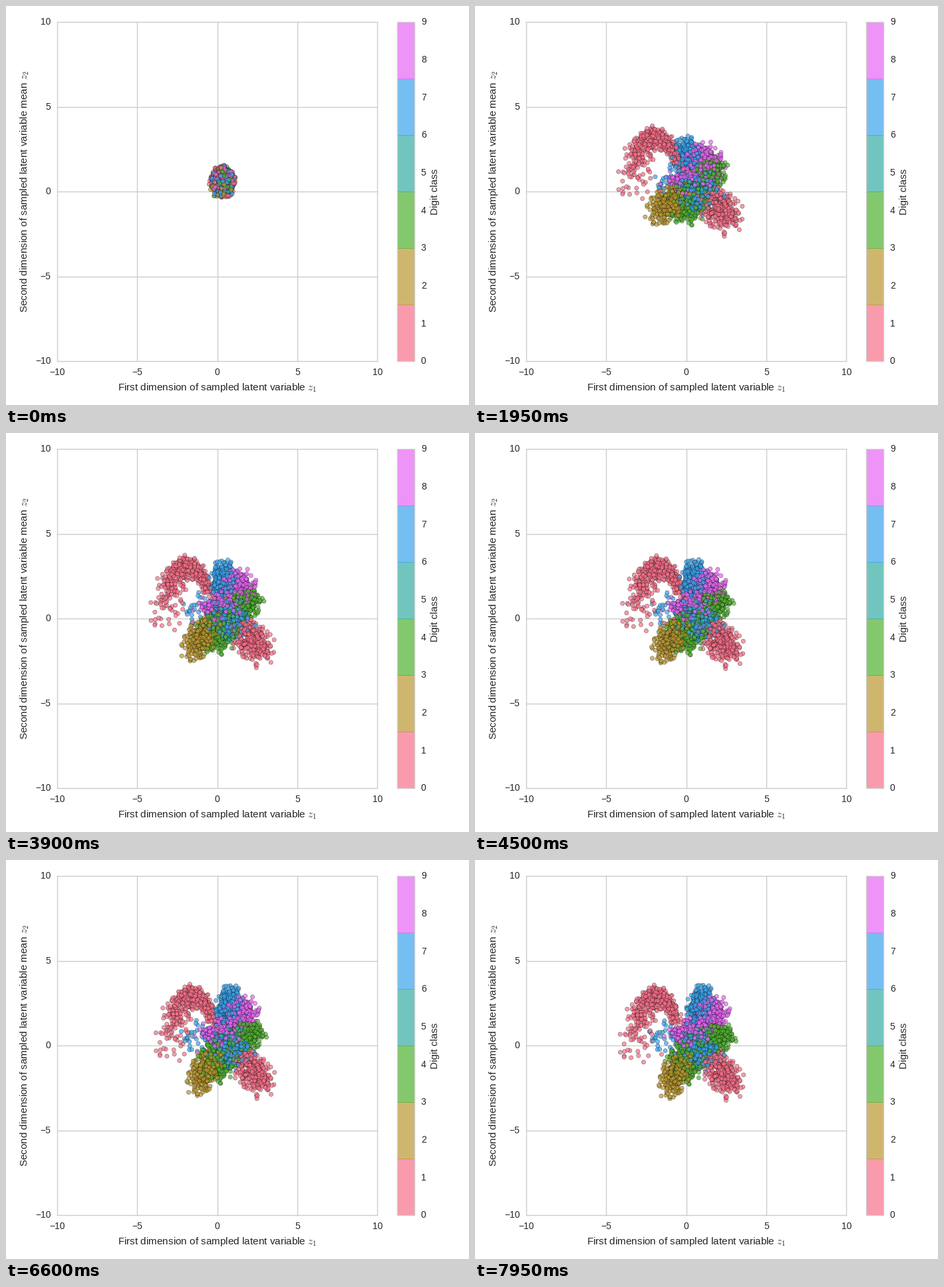
Write a matplotlib script that moves like this. It is 696x600 px and loops after 8 s.

```python
import matplotlib.pyplot as plt
import numpy as np
from matplotlib.animation import FuncAnimation
from matplotlib.patches import Rectangle

W, H, DPI = 696, 600, 100
INTERVAL, TICKS_PER_STEP, FRAMES = 50, 3, 160
LEFT, RIGHT, TOP, BOTTOM = 77.2, 558.2, 24.2, 534.2
BAR_LEFT, BAR_RIGHT = 588.2, 614.2
TICK_PAD = 9.7
GRID = "0.8"
PALETTE = ["#f77189", "#bb9832", "#50b131", "#36ada4", "#3ba3ec", "#e866f4"]
PINK, GOLD, GREEN, TEAL, BLUE, MAGENTA = range(6)

SPREAD_STEP, LAST_STEP = 13, 53
HUB = np.array([328, 265])

# Lobes fan out from the hub: colour, count, final angle, turn, reach, half width
LOBES = [
    (PINK, 360, 53, 6, 69, 28),
    (GOLD, 330, 115, -25, 59, 23),
    (GREEN, 320, 105, 0, 38, 32),
    (GREEN, 320, 0, 35, 32, 26),
    (TEAL, 100, 0, 0, 5, 25),
    (BLUE, 320, 60, 0, 24, 34),
    (BLUE, 340, -77, 25, 44, 22),
    (BLUE, 45, 180, 0, 40, 27),
    (MAGENTA, 300, -100, 0, 8, 40),
    (MAGENTA, 340, -50, 14, 38, 30),
]
N_ARCH = 490

rng = np.random.default_rng(7)


def soft_disk(n):
    """Normal samples with their tails drawn in to about one unit."""
    p = rng.normal(size=(n, 2))
    r = np.hypot(*p.T)[:, None]
    return 1.3 * p * np.tanh(r / 3) / r


counts = [lobe[1] for lobe in LOBES]
angle, turn, reach, width = np.repeat([lobe[2:] for lobe in LOBES], counts, axis=0).T
along, across = soft_disk(sum(counts)).T

t = rng.beta(1.7, 1.5, N_ARCH)[:, None]
loose = (1 - t) ** 2
arch_noise = soft_disk(N_ARCH) * (15 + 12 * loose)
arch_noise[:, 0] += 16 * loose[:, 0] * np.abs(rng.normal(size=N_ARCH))

colours = np.repeat([lobe[0] for lobe in LOBES] + [PINK], counts + [N_ARCH])
order = rng.permutation(len(colours))
seed_cloud = np.array([326, 265]) + soft_disk(len(colours)) * (17, 22)


def lobes_at(w):
    a = np.radians(angle - turn * (1 - w))
    distance = reach * (0.78 + 0.22 * w) + along * (20 + 0.45 * reach)
    side = across * width * (1.15 - 0.15 * w)
    return HUB + np.column_stack([distance * np.cos(a) - side * np.sin(a),
                                  distance * np.sin(a) + side * np.cos(a)])


def arch_at(w, step):
    """Noisy quadratic curve whose crown sways from side to side."""
    foot = np.array([218, 290]) + w * np.array([10, 15])
    crown = np.array([247, 128]) + w * np.array([16, 5])
    end = np.array([304, 242]) + w * np.array([5, 8])
    curve = (1 - t) ** 2 * foot + 2 * t * (1 - t) * crown + t ** 2 * end
    sway = 5 * np.cos(2 * np.pi * (step - 14) / 15)
    return curve + arch_noise + (sway, 0)


def positions(step):
    w = max(0, (step - SPREAD_STEP) / (LAST_STEP - SPREAD_STEP)) ** 0.7
    cloud = np.vstack([lobes_at(w), arch_at(w, step)])
    if step < SPREAD_STEP:
        start = seed_cloud + 0.06 * (cloud - HUB)
        ease = 1 - (1 - step / SPREAD_STEP) ** 2.2
        cloud = start + (cloud - start) * ease
    return cloud[order]


plt.rcParams.update({"font.family": "Liberation Sans", "mathtext.fontset": "cm",
                     "text.color": "0.15", "font.size": 10})
fig = plt.figure(figsize=(W / DPI, H / DPI), dpi=DPI, facecolor="white")
ax = fig.add_axes((0, 0, 1, 1))
ax.set(xlim=(0, W), ylim=(H, 0))
ax.axis("off")


def title(x, y, text, rotation=0):
    ax.text(x, y, text, ha="center", va="baseline", fontsize=11,
            rotation=rotation, rotation_mode="anchor")


for value in range(-10, 11, 5):
    part = (value + 10) / 20
    x = LEFT + (RIGHT - LEFT) * part
    y = BOTTOM - (BOTTOM - TOP) * part
    ax.plot([x, x], [TOP, BOTTOM], color=GRID, lw=1, zorder=1)
    ax.plot([LEFT, RIGHT], [y, y], color=GRID, lw=1, zorder=1)
    name = str(value).replace("-", "\u2212")
    ax.text(x, BOTTOM + TICK_PAD, name, ha="center", va="top")
    ax.text(LEFT - TICK_PAD, y, name, ha="right", va="center")

title(318, 578, "First dimension of sampled latent variable $z_1$")
title(32, 279.5, "Second dimension of sampled latent variable mean $z_2$", 90)
title(648.5, 279.5, "Digit class", 90)

# Neighbouring bands overlap by a pixel, which leaves a darker seam.
band = (BOTTOM - TOP) / len(PALETTE)
for k, colour in enumerate(PALETTE):
    ax.add_patch(Rectangle((BAR_LEFT, BOTTOM - band * (k + 1)), BAR_RIGHT - BAR_LEFT,
                           band + (k > 0), fc=colour, ec="none", lw=0, alpha=0.7))
ax.add_patch(Rectangle((BAR_LEFT, TOP), BAR_RIGHT - BAR_LEFT, BOTTOM - TOP,
                       fc="none", ec=GRID, lw=1))
for digit in range(10):
    ax.text(BAR_RIGHT + TICK_PAD, BOTTOM - (BOTTOM - TOP) * digit / 9, str(digit),
            ha="left", va="center")

dots = ax.scatter(*positions(0).T, s=20, c=[PALETTE[i] for i in colours[order]],
                  edgecolors="black", linewidths=0.3, alpha=0.7, zorder=3)


def update(frame):
    dots.set_offsets(positions(frame // TICKS_PER_STEP))
    return (dots,)


anim = FuncAnimation(fig, update, frames=FRAMES, interval=INTERVAL,
                     repeat=True, repeat_delay=0)
plt.show()
```
